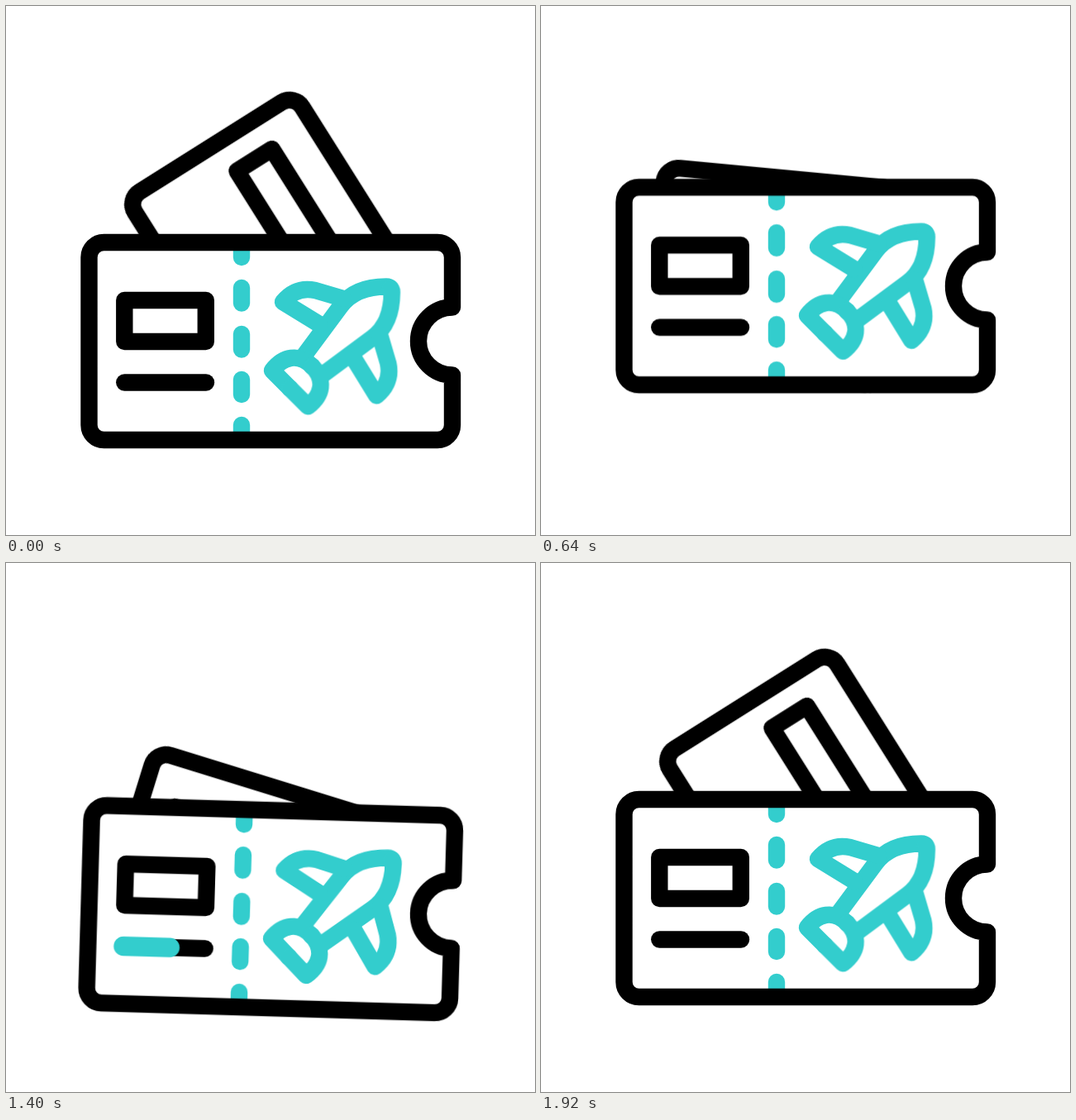
These frames come from a looping animation (640 by 640 pixels, 2080 ms). An HTML page:

```html
<!DOCTYPE html>
<html lang="en">
<head>
<meta charset="utf-8">
<title>Flight tickets</title>
<style>
  :root { --ink: #000; --teal: #33cdcd; --loop: 2080ms; }
  html, body { margin: 0; width: 100%; height: 100%; overflow: hidden; background: #fff; }
  svg { display: block; width: 100vw; height: 100vh; }

  .line { fill: none; stroke: var(--ink); stroke-width: 20.4; stroke-linecap: round; stroke-linejoin: round; }
  .paper { fill: #fff; }
  .teal { stroke: var(--teal); }

  .ticket { transform-origin: 500px 405.5px; animation: bounce var(--loop) infinite; }
  .card { transform-origin: 406.5px 385.5px; animation: swing var(--loop) infinite; }
  .sweep {
    stroke-width: 23.5;
    animation: head var(--loop) infinite, tail var(--loop) infinite, show var(--loop) step-end infinite;
  }

  /* rise, hold, tilt, drop past the rest line, settle */
  @keyframes bounce {
    0%, 1.92% { transform: translateY(0) rotate(0deg); animation-timing-function: cubic-bezier(.63, 0, .7, 1); }
    30.77% { transform: translateY(-66.7px) rotate(0deg); }
    36.54% { transform: translateY(-66.7px) rotate(0deg); animation-timing-function: cubic-bezier(.72, 0, .72, 1); }
    55.77% { transform: translateY(-66.7px) rotate(11.4deg); animation-timing-function: cubic-bezier(.62, 0, .62, 1); }
    73.08% { transform: translateY(62px) rotate(-3.3deg); animation-timing-function: cubic-bezier(.45, 0, .45, 1); }
    92.31%, 100% { transform: translateY(0) rotate(0deg); }
  }

  /* the rear card folds away behind the ticket and comes back */
  @keyframes swing {
    0%, 1.92% { transform: rotate(57.8deg); animation-timing-function: cubic-bezier(.87, 0, .885, 1); }
    32.69% { transform: rotate(0deg); }
    55.77% { transform: rotate(0deg); animation-timing-function: cubic-bezier(.755, 0, .755, 1); }
    76.92%, 100% { transform: rotate(57.8deg); }
  }

  /* leading end, trailing end and visibility of the teal sweep */
  @keyframes head {
    0%, 55.77% { stroke-dasharray: 0 300; animation-timing-function: cubic-bezier(.68, 0, .68, 1); }
    73.08%, 100% { stroke-dasharray: 100 300; }
  }
  @keyframes tail {
    0%, 69.23% { stroke-dashoffset: 0; animation-timing-function: cubic-bezier(.68, 0, .68, 1); }
    86.54%, 100% { stroke-dashoffset: -100; }
  }
  @keyframes show {
    0% { opacity: 0; }
    55.77% { opacity: 1; }
    86.54%, 100% { opacity: 0; }
  }
</style>
</head>
<body>
<svg viewBox="0 0 640 640">
  <defs>
    <path id="body" d="M540 364.5V304a18 18 0 0 0-18-18H118.5a18 18 0 0 0-18 18V507a18 18 0 0 0 18 18H522a18 18 0 0 0 18-18V446.5a41 41 0 0 1 0-82Z"/>
    <!-- one side of the plane: fuselage, wing, tail fin -->
    <g id="half">
      <path d="M359 425L405 363C416 348 433 339.5 460 339.5Q463.5 339.5 465 341.4"/>
      <path d="M408 354L374 344C358 340.5 345 346 335 358L379 385"/>
      <path d="M343.7 462.7L322 441C335 424 354 419.5 370.5 435.9"/>
    </g>
  </defs>

  <g class="ticket">
    <g class="card">
      <rect class="line paper" x="140" y="286" width="284" height="239" rx="18"/>
      <rect class="line" x="181.5" y="344" width="150" height="50"/>
    </g>

    <use href="#body" class="paper"/>
    <path class="line teal" d="M285 288V304M285 341V359.5M285 397V415.5M285 452V470M285 507V523"/>
    <use href="#body" class="line"/>

    <rect class="line" x="143.3" y="356" width="98.5" height="50"/>
    <path class="line" d="M143.3 455.5H242"/>
    <path class="line teal sweep" pathLength="100" d="M143.3 455.5H242"/>

    <g class="line teal">
      <use href="#half"/>
      <use href="#half" transform="matrix(0 -1 -1 0 806.4 806.4)"/>
    </g>
  </g>
</svg>
</body>
</html>
```
